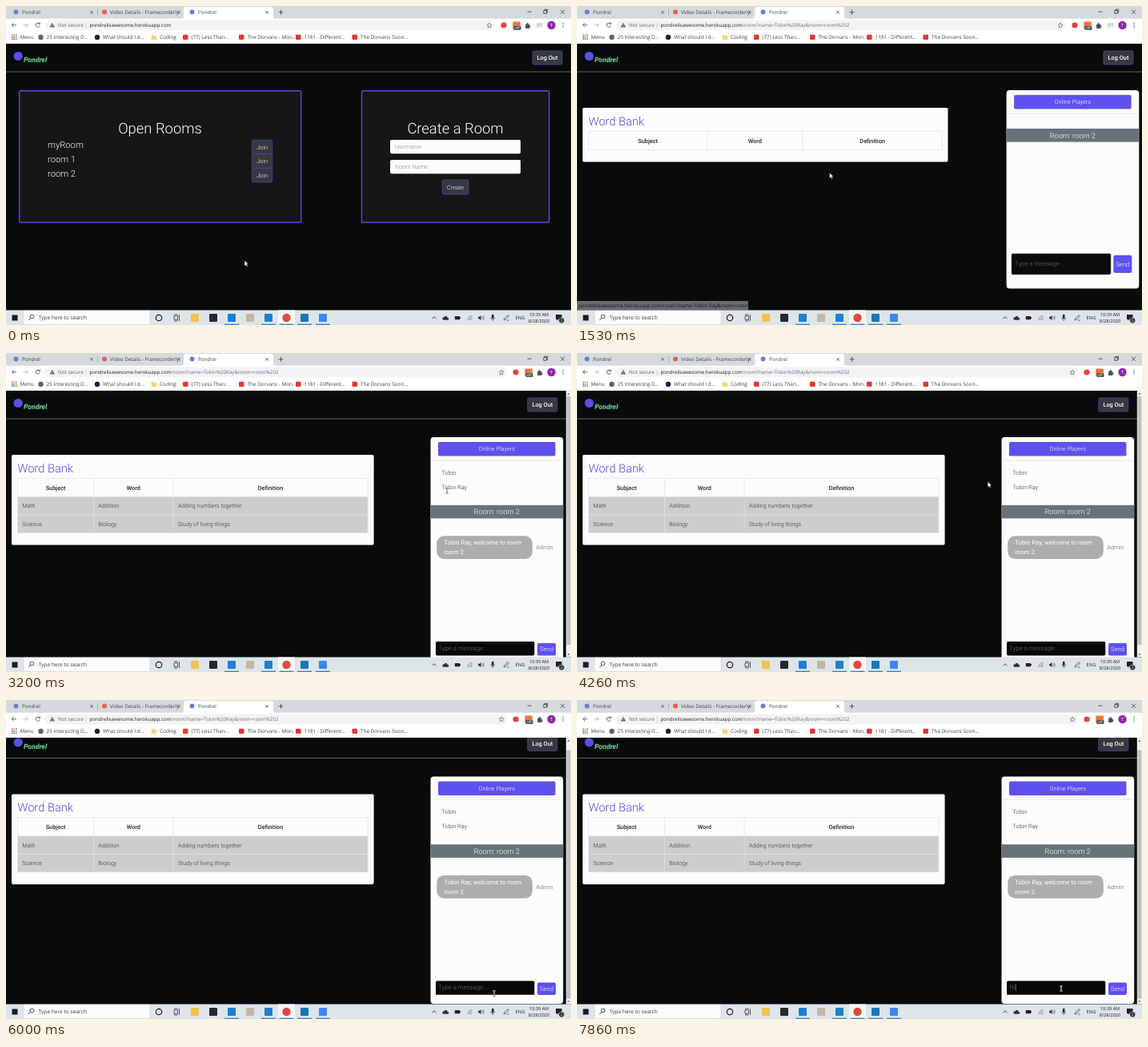
Write an HTML page that moves like this. It is 706 px wide and 398 px high and loops after 8000 ms.

```html
<!DOCTYPE html>
<html lang="en">
<head>
<meta charset="utf-8">
<title>Study room</title>
<style>
html, body { margin: 0; width: 100%; height: 100%; overflow: hidden; background: #090b0b; }
svg { display: block; width: 100%; height: 100%; }
text { white-space: pre; text-rendering: geometricPrecision; }
.ui { font-family: "Open Sans", sans-serif; }
.pg { font-family: Roboto, sans-serif; }
</style>
</head>
<body>
<svg id="stage" viewBox="0 0 706 398"></svg>
<script>
const LOOP = 8000;
const PURPLE = '#5e50ee', DARK = '#343a40', WHITE = '#fcfcfc';
const SITE = 'pondrelisawesome.herokuapp.com';

// Drawing helpers
const rect = (x, y, r, b, fill, rx = 0, extra = '') =>
  `<rect x="${x}" y="${y}" width="${r - x}" height="${b - y}" rx="${rx}" fill="${fill}" ${extra}/>`;
const disc = (x, y, r, fill, extra = '') => `<circle cx="${x}" cy="${y}" r="${r}" fill="${fill}" ${extra}/>`;
const line = (d, color = '#444', w = 0.8, fill = 'none') =>
  `<path d="${d}" stroke="${color}" stroke-width="${w}" fill="${fill}"/>`;
const text = (cls, x, y, str, size, fill, weight = 400, anchor = 'start') =>
  `<text class="${cls}" x="${x}" y="${y}" font-size="${size}" fill="${fill}" font-weight="${weight}" text-anchor="${anchor}">${str}</text>`;
const ui = (x, y, str, size = 6.3, fill = '#3c4043', anchor) => text('ui', x, y, str, size, fill, 400, anchor);
const pg = (x, y, str, size = 7.36, fill = '#fff', weight = 400, anchor) => text('pg', x, y, str, size, fill, weight, anchor);
const mid = (x, y, str, size, fill, weight) => pg(x, y, str, size, fill, weight, 'middle');
const group = (id, body) => `<g id="${id}">${body}</g>`;
const button = (x, y, r, b, label, weight = 400) =>
  rect(x, y, r, b, DARK, 1.8, 'stroke="#4c45a0" stroke-width=".8"') +
  mid((x + r) / 2, (y + b) / 2 + 2.6, label, 7.36, '#fff', weight);
const cross = x => line(`M${x - 1.8} 6l3.6 3.6m0 -3.6l-3.6 3.6`, '#45494d', 0.8);

function tabs() {
  return rect(0, 0, 706, 16, '#d5dadd') +
    `<path d="M219 16q3 0 3-3V4q0-3 3-3h106q3 0 3 3v9q0 3 3 3z" fill="#fff"/>` +
    disc(12.5, 7.5, 3, '#6d7fd0') + ui(20, 10, 'Pondrel') + cross(107) +
    line('M114.5 4v8', '#90969a', 0.6) +
    disc(123, 7.5, 3, '#ee5a52') + ui(130, 10, 'Video Details - Framecorderly') + cross(216) +
    disc(232.5, 7.5, 3, '#6d7fd0') + ui(240, 10, 'Pondrel') + cross(326) +
    line('M340.5 7.8h6m-3 -3v6', '#45494d', 0.9) +
    line('M651.5 7.2h5M671.8 5.5h3.6v3.8h-3.6zM673 5.5v-1.2h3.6v3.8h-1.2M693 4.8l5 5m0 -5l-5 5', '#222', 0.7);
}

function toolbar() {
  const star = 'M0 -3l.9 2 2.1.2-1.6 1.5.5 2.2-1.9-1.2-1.9 1.2.5-2.2-1.6-1.5 2.1-.2z';
  const puzzle = 'M-2.6-1.6h1.6q-.5-1.8 1-1.8t1 1.8h1.6v1.7q1.4 0 1.4 1t-1.4 1v1.7h-5.2z';
  const tools = `<g transform="translate(604 24)">${line(star, '#555', 0.6)}</g>` +
    disc(622, 24, 3.6, '#e8413d') +
    rect(633.3, 19.5, 642.8, 29, '#f0743e', 1) + rect(634.5, 25, 643.5, 30, '#4b5055', 1) +
    ui(639, 29, 'off', 4.6, '#fff', 'middle') +
    `<path transform="translate(651.7 24.3)" d="${puzzle}" fill="#4b5055"/>`;
  return rect(0, 15.8, 706, 47, '#fff') +
    `<rect id="omni" x="49" y="17.5" width="562" height="13" rx="6.5" fill="#f1f3f4"/>` +
    line('M13 23.8h-5.5m2.5 -2.6l-2.6 2.6 2.6 2.6', '#50555a', 0.9) +
    line('M21.5 23.8h5.5m-2.5 -2.6l2.6 2.6 -2.6 2.6', '#b5b9bd', 0.9) +
    line('M42 22.3a2.6 2.6 0 1 0 .3 2.3M42.4 20.6v2h-2', '#50555a', 0.9) +
    `<path d="M57.8 20.8l3.2 5.8h-6.4z" fill="#5f6368"/>` + line('M57.8 22.8v1.8m0 .6v.6', '#fff', 0.6) +
    ui(65, 26.1, 'Not secure', 6.3, '#5f6368') + line('M100 20.5v7', '#b8bcc0', 0.6) +
    `<text class="ui" x="104.5" y="26.1" font-size="6.2" fill="#202124">${SITE}<tspan id="path" fill="#6c7176">/room?name=Tobin%20Ray&amp;room=room%202</tspan></text>` +
    group('tools', tools) +
    group('queue', line('M663 22h5M663 24h5M663 26h3M669.2 26.4v-4.4h1.4', '#8b9095', 0.7)) +
    disc(681.5, 24, 5.2, '#9027a8') + ui(681.5, 26, 'T', 5.6, '#fff', 'middle') +
    [21.5, 24, 26.5].map(y => disc(696, y, 0.75, '#50555a')).join('');
}

function bookmarks() {
  const tints = ['#e35b50', '#e8a23c', '#5b9a5b', '#4f86d9'];
  const grid = Array.from({ length: 9 }, (_, i) => {
    const x = 7 + i % 3 * 2.5, y = 35.5 + (i / 3 | 0) * 2.5;
    return rect(x, y, x + 1.7, y + 1.7, tints[i % 4]);
  }).join('');
  const video = (x, label) => rect(x, 35.8, x + 6.5, 42, '#e7352c', 1.2) + ui(x + 10.5, 41.2, label, 6.4);
  return grid + ui(17.5, 41.2, 'Menu', 6.4) +
    disc(43.5, 39, 3.2, '#5f6368') + ui(50.5, 41.2, '25 Interesting D...', 6.4) +
    disc(114, 39, 3.2, '#20213c') + ui(121, 41.2, 'What should I d...', 6.4) +
    `<path d="M181.5 36h2.5l1 1h3.2v5.2h-6.7z" fill="#f5d675"/>` + ui(192, 41.2, 'Coding', 6.4) +
    video(221, '(77) Less Than...') + video(291, 'The Dorvans - Mon...') +
    video(362, '1181 - Different...') + video(432.5, 'The Dorvans Soon...');
}

function taskbar() {
  const pins = [[236, '#f2c14e'], [259, '#26292b'], [282, '#1c7fd6'], [305, '#c5b6a4'], [328, '#1f80cc'],
    [350.5, '#dd4b3e'], [373, '#1678b8'], [396, '#3c86f5']];
  const icons = pins.map(([x, c], i) => i === 5 ? disc(x, 389, 5.2, c) : rect(x - 5, 384, x + 5, 394, c, 1)).join('');
  const open = [282, 328, 350.5, 373, 396].map(x => rect(x - 9, 396.7, x + 9, 398, '#3581c4')).join('');
  return rect(0, 379.5, 706, 398, '#dde5e9') + rect(7.5, 385.5, 14.5, 392.5, '#181a1c') +
    rect(22, 380, 180, 397.6, '#fafbfb', 0, 'stroke="#c2c9cd" stroke-width=".5"') +
    disc(32.4, 387.5, 2.4, 'none', 'stroke="#222" stroke-width=".8"') + line('M30.7 389.3l-2.5 2.7', '#222') +
    ui(40.5, 391.2, 'Type here to search', 6.6, '#3a3d40') +
    disc(191, 389, 3.7, 'none', 'stroke="#1b1d1f" stroke-width="1.2"') +
    line('M210 386.8h4.5v4.5h-4.5zM210 385h4.5M210 393h4.5M216.5 385v8', '#333', 0.8) +
    rect(340, 379.5, 361, 398, '#f3f6f7') + icons + open +
    line('M532.5 390.3l2.5-2.6 2.5 2.6', '#222') +
    `<path d="M547 391.8q-2-.2-1.6-2t2-1.4q1-2.4 3.2-1.2 1 .4 1 1.6 1.9.2 1.7 1.7t-1.7 1.3z" fill="#333"/>` +
    rect(560.8, 387, 567, 391.2, '#222', 0.5) + rect(567, 388.2, 568, 390, '#222') +
    line('M577 392a6 6 0 0 1 5.5-5.5M579 392a4 4 0 0 1 3.5-3.5M581 392a2 2 0 0 1 1.5-1.5', '#777', 0.8) +
    `<path d="M590 387.8h1.5l2-1.8v6l-2-1.8h-1.5z" fill="#333"/>` + line('M594.8 387.5q1 1.5 0 3M596.3 386.3q2 2.7 0 5.4', '#333', 0.6) +
    rect(606.9, 384.8, 609.5, 390, '#222', 1.3) + line('M605.8 388.7q0 2.6 2.4 2.6t2.4-2.6M608.2 391.3v1.8', '#222', 0.6) +
    line('M622 392l1-2.5 4-4 1.5 1.5-4 4zM626 392.2h2.5', '#333', 0.7) +
    ui(642.5, 391.2, 'ENG', 5.8, '#222', 'middle') +
    ui(666, 386.8, '10:39 AM', 5.6, '#222', 'middle') + ui(666, 395.2, '8/28/2020', 5.6, '#222', 'middle') +
    `<path d="M687 385h7.5v6h-4.5l-1.5 1.8v-1.8h-1.5z" fill="#222"/>` +
    disc(694.2, 392.3, 3.4, '#26292b', 'stroke="#dde5e9" stroke-width=".5"') + ui(694.2, 394.2, '2', 5, '#fff', 'middle');
}

function header() {
  return disc(15.2, 62.5, 5.6, '#5b4fe6') +
    `<text class="pg" x="22" y="70.3" font-size="8.6" font-weight="700" font-style="italic" fill="#8fdcab" stroke="#178a4c" stroke-width=".3">Pondrel</text>` +
    rect(0, 81.6, 706, 82.6, '#5d6161') +
    group('logout', button(658, 56, 695, 73, 'Log Out', 500));
}

function lobby() {
  const card = (x, r) => rect(x, 105.7, r, 270, '#161617', 1.8, 'stroke="#574bd6" stroke-width="1.4"');
  const field = (y, label) => rect(480, y, 643, y + 17.3, WHITE, 1.8) + pg(486, y + 11.3, label, 7.36, '#858a90', 300);
  const rooms = ['myRoom', 'room 1', 'room 2'].map((name, i) =>
    pg(52, 177.3 + i * 17.6, name, 11.2, '#fff', 300) +
    button(307.2, 167.2 + i * 17.6, 332.8, 184.6 + i * 17.6, 'Join', 300)).join('');
  return card(16.7, 368.7) + card(444.5, 678.7) +
    mid(192.5, 158.5, 'Open Rooms', 18.4, '#fff', 300) + rooms +
    mid(561.5, 158.5, 'Create a Room', 18.4, '#fff', 300) +
    field(167, 'Username') + field(192, 'Room Name') + button(545.2, 217, 578, 235, 'Create', 300);
}

// Word table; cols holds its left, inner and right edges
function wordBank(right, bottom, cols, rows) {
  const edge = 'stroke="#dee2e6" stroke-width=".7"';
  const end = 179.5 + rows.length * 22.4;
  const cells = rows.map((row, i) => {
    const y = 179.5 + i * 22.4;
    return rect(cols[0], y, cols[3], y + 22.4, '#cdcdcd', 0, edge) +
      row.map((s, j) => pg(cols[j] + 5.7, y + 13.7, s, 7.2, '#303234', 300)).join('');
  }).join('');
  const heads = ['Subject', 'Word', 'Definition'].map((s, i) =>
    mid((cols[i] + cols[i + 1]) / 2, 170.6, s, 7.36, '#212529', 500)).join('');
  return rect(7, 127, right, bottom, WHITE, 1.8) + pg(14.2, 149, 'Word Bank', 14.7, '#574ae0', 300) +
    rect(cols[0], 156.2, cols[3], 179.5, 'none', 0, edge) + cells +
    [cols[1], cols[2]].map(x => line(`M${x} 156.2V${end}`, '#dee2e6', 0.7)).join('') + heads;
}

function chatPanel(x, bottom, bar) {
  return rect(x, 105, x + 165.7, bottom, WHITE, 4) +
    rect(x + 9.5, 111, x + 156, 128.6, PURPLE, 1.8) + mid(x + 82.7, 122.4, 'Online Players', 7.36, '#fff', 300) +
    rect(x, 133.8, x + 165.7, 134.5, '#dedede') +
    rect(x, bar, x + 165.7, bar + 16.6, '#687378') + mid(x + 82.7, bar + 11.5, 'Room: room 2', 9.2, '#fff', 300);
}

function emptyRoom() {
  return wordBank(463.5, 194.5, [14.5, 162.7, 281.8, 456.5], []) + chatPanel(536.6, 352.5, 153) +
    rect(543, 309, 667, 335, '#0a0b0b', 1.8, 'stroke="#52616a" stroke-width=".6"') +
    pg(547, 324.3, 'Type a message...', 7.8, '#6b6d70', 300) +
    rect(670.3, 311, 693.3, 333, PURPLE, 1.8) + mid(681.8, 324.8, 'Send', 7.6, '#fff', 300);
}

function fullRoom() {
  return wordBank(459.6, 239.5, [14.5, 109.6, 209, 452], [
    ['Math', 'Addition', 'Adding numbers together'],
    ['Science', 'Biology', 'Study of living things']]) +
    chatPanel(530.5, 388.7, 189.8) +
    pg(544.3, 151.5, 'Tobin', 7.36, '#303234', 300) + pg(544.3, 170.1, 'Tobin Ray', 7.36, '#303234', 300) +
    rect(538.3, 228.3, 657.8, 257, '#adadad', 9) +
    pg(547.3, 239.2, 'Tobin Ray, welcome to room', 7.75, '#fff') + pg(547.3, 251.3, 'room 2.', 7.75, '#fff') +
    pg(662.3, 245.2, 'Admin', 7.5, '#606264', 300) +
    rect(537, 360, 660.3, 377.5, '#070808', 1.8) +
    `<rect id="rule" x="537" y="376.6" width="123.3" height="1" fill="#5b3a52"/>` +
    `<text id="msg" class="pg" x="540.3" y="371" font-size="7.8" font-weight="300" fill="#6b6d70"></text>` +
    `<rect id="caret" y="364" width=".7" height="8.5" fill="#999"/>` +
    rect(664, 362, 687, 377.5, PURPLE, 1.8) + mid(675.5, 372.4, 'Send', 7.6, '#fff', 300);
}

function scrollbar() {
  return rect(699.8, 47, 706, 379.5, '#f1f1f1') +
    `<rect id="thumb" x="700.4" y="54" width="5" height="310" fill="#c1c1c1"/>` +
    `<path d="M701.4 51.8h3l-1.5-2zM701.4 375.2h3l-1.5 2z" fill="#555"/>`;
}

const beam = 'M-1.6-3.2h1.2l.4.4.4-.4h1.2M-1.6 3.2h1.2l.4-.4.4.4h1.2M0-2.8v5.6';
const cursors =
  group('arrow', line('M0 0v7l1.7-1.5 1.1 2.4 1.2-.6-1.1-2.3h2.2z', '#111', 0.5, '#fff')) +
  group('hand', line('M-.8 0q.8-.9 1.5 0v3l3 .7q.9.3.8 1.3l-.6 3h-4l-2.4-3.4q.2-1 1.7.2z', '#111', 0.5, '#fff')) +
  group('beam', line(beam, '#fff', 1.3) + line(beam, '#222', 0.7));

document.getElementById('stage').innerHTML =
  rect(0, 0, 706, 398, '#090b0b') +
  group('page', header() + group('lobby', lobby()) + group('empty', emptyRoom()) + group('full', fullRoom())) +
  group('bar', scrollbar()) +
  group('status', rect(0, 368, 214, 379.5, '#dee1e6', 1) +
    ui(2, 376.2, SITE + '/room?name=Tobin Ray&amp;room=room 2', 6.3, '#202124')) +
  tabs() + toolbar() + bookmarks() + taskbar() + group('cursor', cursors);

const el = {};
document.querySelectorAll('[id]').forEach(n => el[n.id] = n);
const show = (id, on) => el[id].style.display = on ? '' : 'none';
const move = (id, x, y) => el[id].setAttribute('transform', `translate(${x} ${y})`);
const clamp = v => Math.min(1, Math.max(0, v));
const ease = v => v * v * (3 - 2 * v);

// Pointer path: time, x, y
const path = [
  [0, 298, 317.5], [860, 319, 212], [930, 319, 212], [1330, 315.5, 208], [2000, 315.5, 208],
  [2400, 520, 150], [2600, 520, 150], [3060, 552, 170], [3200, 551, 172], [3530, 548, 160],
  [4130, 548, 160], [4930, 62, 168], [5130, 74, 169], [5560, 300, 170], [5800, 520, 310],
  [6000, 610, 366], [6400, 608, 363], [6600, 608, 363], [6860, 605, 360], [LOOP, 605, 360]];

function pointer(t) {
  const i = Math.max(1, path.findIndex(p => p[0] > t));
  const [a, b] = [path[i - 1], path[i]];
  const k = ease((t - a[0]) / (b[0] - a[0]));
  return [a[1] + (b[1] - a[1]) * k, a[2] + (b[2] - a[2]) * k];
}

function render(t) {
  const full = t >= 1860, inRoom = t >= 1530;
  const [x, y] = pointer(t);
  const scroll = 9.6 * ease(clamp((t - 5850) / 130));

  show('lobby', !inRoom);
  show('empty', inRoom && !full);
  show('full', full);
  show('bar', full);
  show('path', inRoom);
  move('page', 0, -scroll);
  move('logout', full ? -6.2 : 0, 0);
  el.thumb.setAttribute('y', 54 + scroll * 0.9);

  // The media button leaves and the tools close the gap
  const wide = t >= 2600;
  show('queue', !wide);
  move('tools', wide ? 15 : 0, 0);
  el.omni.setAttribute('width', wide ? 577 : 562);

  const hover = !inRoom && y < 219.5;
  show('status', hover || (inRoom && t < 1660));
  el.status.style.opacity = inRoom ? 0.45 : 1;

  const typed = t >= 7860 ? 'Hi' : t >= 7530 ? 'H' : '';
  el.msg.textContent = typed || 'Type a message...';
  show('rule', t >= 5980);
  show('caret', t >= 6860 && (t < 7130 || t >= 7530));
  el.caret.setAttribute('x', 540.3 + [0, 5.6, 7.5][typed.length]);

  const overText = t > 2000 && (x > 531 || (x < 460 && y > 127 && y < 240));
  show('hand', hover);
  show('beam', overText);
  show('arrow', !hover && !overText);
  move('cursor', x, y);
}

const start = performance.now();
function tick() {
  render((performance.now() - start) % LOOP);
  requestAnimationFrame(tick);
}
tick();
</script>
</body>
</html>
```
